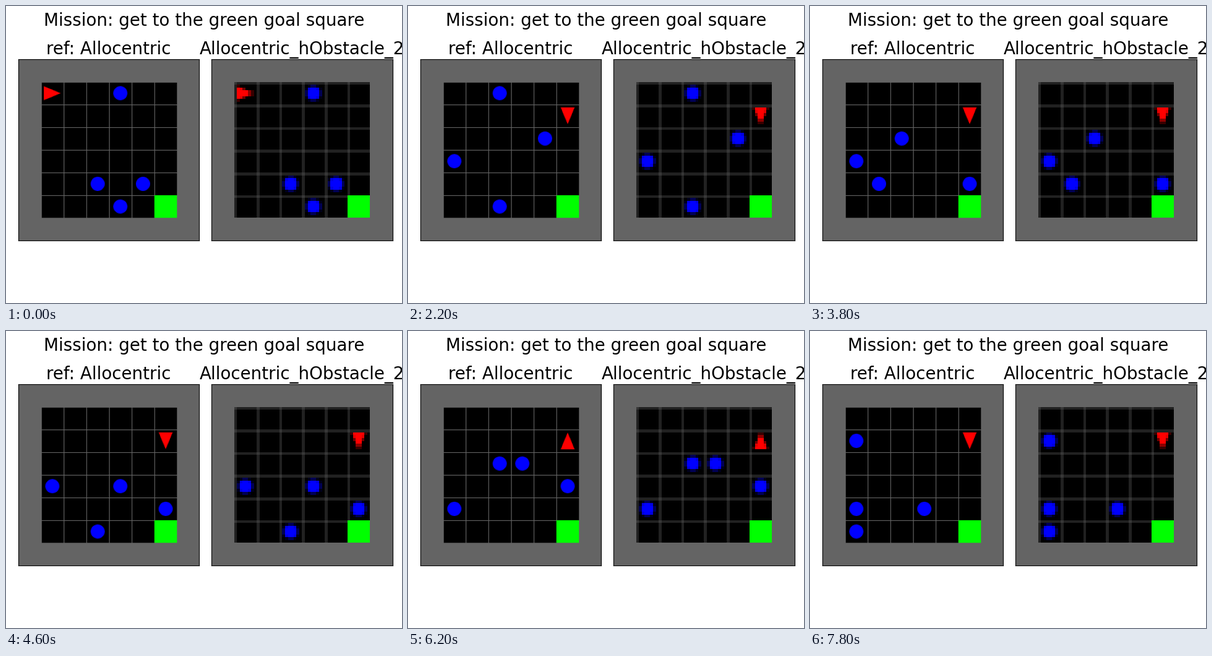
Write a matplotlib script that moves like this. It is 640x480 px and loops after 8000 ms.

```python
import itertools
import random

import matplotlib.pyplot as plt
import numpy as np
from matplotlib.animation import FuncAnimation

W, H, DPI = 640, 480, 100
FRAMES, STEP_MS = 40, 200
CELLS = 8
GOAL = (6, 6)
GREY, RED, GREEN, BLUE = (100,) * 3, (255, 0, 0), (0, 255, 0), (0, 0, 255)

# Ball cells at key steps; between them each ball wanders one cell per step.
KEYS = {
    0: [(4, 1), (5, 5), (3, 5), (4, 6)],
    11: [(3, 1), (5, 3), (1, 4), (3, 6)],
    16: [(3, 2), (6, 4), (2, 5), (4, 5)],
    23: [(4, 4), (6, 5), (1, 4), (3, 6)],
    27: [(3, 3), (5, 5), (2, 2), (2, 6)],
    35: [(3, 3), (5, 3), (1, 4), (3, 6)],
    39: [(1, 2), (4, 5), (1, 5), (1, 6)],
}
RIGHT_TURNS = {6, 27, 39}


def agent_path():
    """Five cells right, turn, one cell down, then keep turning."""
    path, x, y, heading = [], 1, 1, 0
    for step in range(FRAMES):
        if 1 <= step <= 5:
            x += 1
        elif step == 7:
            y += 1
        elif step > 5:
            heading = (heading + (1 if step in RIGHT_TURNS else -1)) % 4
        path.append(((x, y), heading))
    return path


def distance(a, b):
    return max(abs(a[0] - b[0]), abs(a[1] - b[1]))


def moves(cell, target, left, blocked, top):
    options = []
    for dx, dy in itertools.product((-1, 0, 1), repeat=2):
        new = (cell[0] + dx, cell[1] + dy)
        inside = 1 <= new[0] <= 6 and top <= new[1] <= 6
        if new == cell or not inside or new in blocked:
            continue
        gap = distance(new, target)
        if gap <= left and not (left == 1 and gap == 0):
            options.append(new)
    return options


def ball_path(agent):
    rng = random.Random(4)
    path = [KEYS[0]]
    for step in range(1, FRAMES):
        key = min(k for k in KEYS if k >= step)
        blocked = {GOAL, agent[step][0], agent[min(step + 1, FRAMES - 1)][0]}
        top = 2 if 18 <= step <= 24 or step >= 30 else 1
        options = [moves(c, t, key - step, blocked, top)
                   for c, t in zip(path[-1], KEYS[key])]
        path.append(rng.choice([c for c in itertools.product(*options)
                                if len(set(c)) == len(c)]))
    return path


def make_tile(kind, size, heading=0):
    """Draw one cell at three times its size and average it down."""
    n = size * 3
    c = (np.arange(n) + 0.5) / n
    x, y = np.meshgrid(c, c)
    img = np.zeros((n, n, 3))
    img[(x <= 0.031) | (y <= 0.031)] = GREY
    if kind == "wall":
        img[:] = GREY
    elif kind == "goal":
        img[:] = GREEN
    elif kind == "ball":
        img[(x - 0.5) ** 2 + (y - 0.5) ** 2 <= 0.31 ** 2] = BLUE
    elif kind == "agent":
        a = heading * np.pi / 2
        u = 0.5 + (x - 0.5) * np.cos(a) + (y - 0.5) * np.sin(a)
        v = (y - 0.5) * np.cos(a) - (x - 0.5) * np.sin(a)
        img[(u >= 0.12) & (np.abs(v) <= 0.31 * (0.87 - u) / 0.75)] = RED
    return img.reshape(size, 3, size, 3, 3).mean(axis=(1, 3)).astype(np.uint8)


class Board:
    def __init__(self, size):
        self.size = size
        self.ball = make_tile("ball", size)
        self.agents = [make_tile("agent", size, d) for d in range(4)]
        self.base = np.tile(make_tile("floor", size), (CELLS, CELLS, 1))
        wall = make_tile("wall", size)
        for x, y in itertools.product(range(CELLS), repeat=2):
            if {x, y} & {0, CELLS - 1}:
                self.put(self.base, (x, y), wall)
        self.put(self.base, GOAL, make_tile("goal", size))

    def put(self, img, cell, tile):
        x, y = (v * self.size for v in cell)
        img[y:y + self.size, x:x + self.size] = tile

    def render(self, step):
        img = self.base.copy()
        for cell in balls[step]:
            self.put(img, cell, self.ball)
        cell, heading = agent[step]
        self.put(img, cell, self.agents[heading])
        return img


agent = agent_path()
balls = ball_path(agent)

fig = plt.figure(figsize=(W / DPI, H / DPI), dpi=DPI)
fig.suptitle("Mission: get to the green goal square", fontsize=20)

SIDE, TOP = 292.63, 86.2
views = []
for left, size, title in [(19.86, 32, "ref: Allocentric"),
                          (332.36, 8, "Allocentric_hObstacle_2")]:
    ax = fig.add_axes([left / W, 1 - (TOP + SIDE) / H, SIDE / W, SIDE / H])
    ax.set_title(title, fontsize=20)
    ax.set_xticks([])
    ax.set_yticks([])
    board = Board(size)
    views.append((board, ax.imshow(board.render(0))))


def update(step):
    for board, image in views:
        image.set_data(board.render(step))
    return [image for _, image in views]


anim = FuncAnimation(fig, update, frames=FRAMES, interval=STEP_MS,
                     repeat=True, repeat_delay=0)
plt.show()
```
